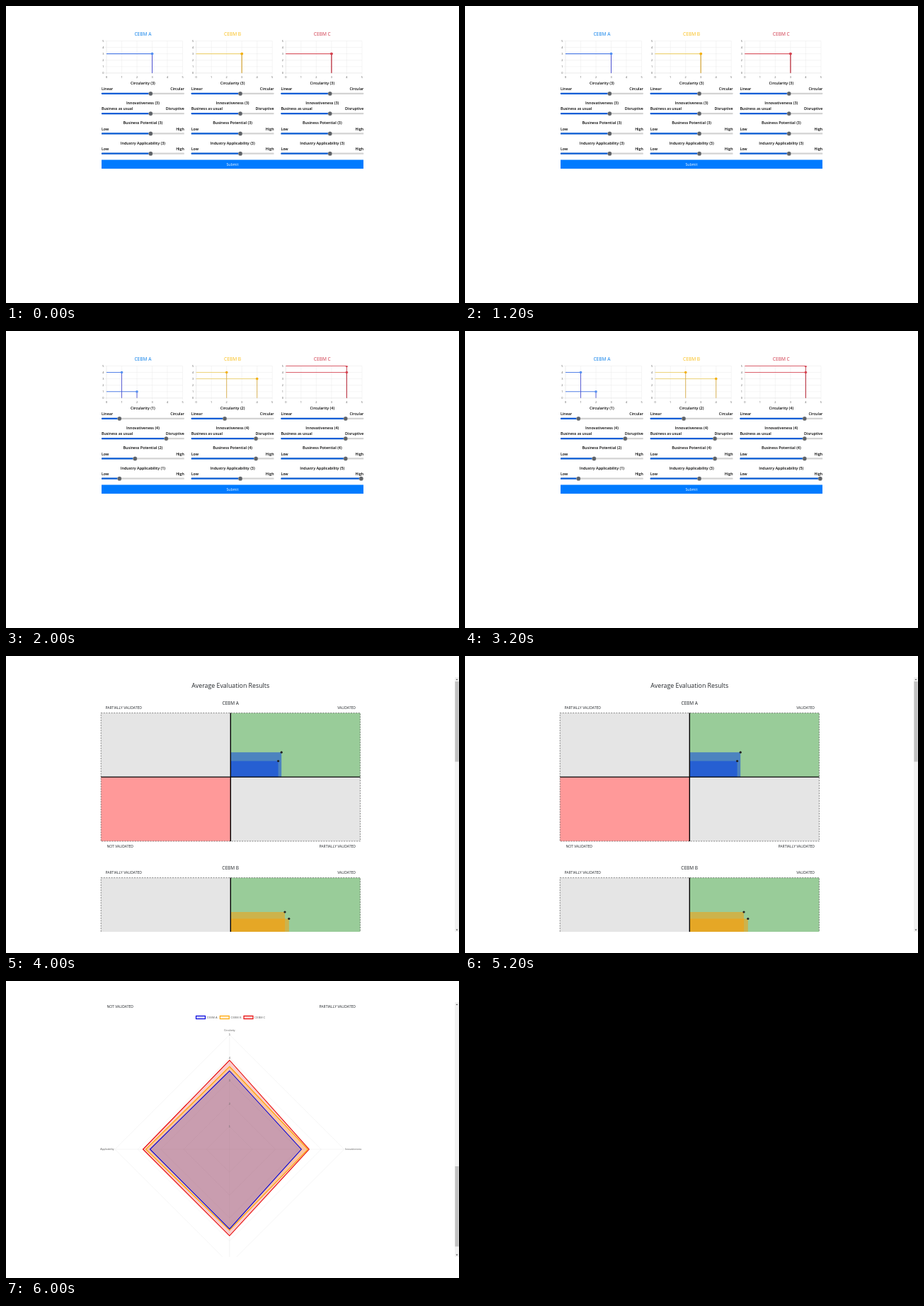
An HTML page that plays this animation: 640x420 px, repeating every 8 s.

```html
<!DOCTYPE html>
<html lang="en">
<head>
<meta charset="utf-8">
<title>Evaluation form and results</title>
<style>
html, body { margin: 0; width: 100%; height: 100%; overflow: hidden; background: #fff; }
svg { display: block; width: 640px; height: 420px; font-family: "Open Sans", "Noto Sans", sans-serif; fill: #212529; }
.scene { visibility: hidden; animation: show 8s step-end infinite; }
#votes { animation-delay: -6s; }
#quads { animation-delay: -4s; }
#radar { animation-delay: -2s; }
@keyframes show { 0% { visibility: visible; } 25%, 100% { visibility: hidden; } }
.arial { font-family: "Liberation Sans", Arial, sans-serif; fill: #666; }
.bold { font-weight: 600; fill: #000; }
</style>
</head>
<body>
<svg viewBox="0 0 640 420">
  <defs><clipPath id="page"><rect x="0" y="30" width="640" height="360"/></clipPath></defs>
  <g class="scene" id="start"></g>
  <g class="scene" id="votes"></g>
  <g class="scene" id="quads"></g>
  <g class="scene" id="radar"></g>
</svg>
<script>
const text = (x, y, size, str, anchor = "middle", extra = "") =>
  `<text x="${x}" y="${y}" font-size="${size}" text-anchor="${anchor}" ${extra}>${str}</text>`;
const rect = (x, y, w, h, fill, extra = "") =>
  `<rect x="${x}" y="${y}" width="${w}" height="${h}" fill="${fill}" ${extra}/>`;
const line = (x1, y1, x2, y2, color, w = 0.4) =>
  `<path d="M${x1} ${y1}L${x2} ${y2}" stroke="${color}" stroke-width="${w}"/>`;
const dot = (x, y, r, fill, extra = "") => `<circle cx="${x}" cy="${y}" r="${r}" fill="${fill}" ${extra}/>`;
const put = (id, html) => document.getElementById(id).innerHTML = html;

// Voting form: four sliders drive two points per chart
const panels = [
  { name: "CEBM A", x: 135, title: "#0a7fea", h: "#4274e6", v: "#4a4fd0", dot: "#5590f2" },
  { name: "CEBM B", x: 261.7, title: "#f9bd14", h: "#ecd06c", v: "#d9ae48", dot: "#f3b012" },
  { name: "CEBM C", x: 388.4, title: "#d03a4c", h: "#d9505c", v: "#bf3b48", dot: "#d64350" }
];
const sliders = [
  ["Circularity", "Linear", "Circular"],
  ["Innovativeness", "Business as usual", "Disruptive"],
  ["Business Potential", "Low", "High"],
  ["Industry Applicability", "Low", "High"]
];

function chart(p, vals) {
  const px = v => p.x + 7 + v * 21.5, py = v => 94.8 - v * 9.07;
  let s = "";
  for (let i = 0; i <= 5; i++) {
    const c = i ? "#e6e6e6" : "#cfcfcf";
    s += line(px(i), py(5), px(i), 96.8, c) + line(p.x + 5, py(i), px(5), py(i), c);
    s += text(px(i), 102.2, 3.9, i, "middle", 'fill="#555"') + text(p.x + 3.6, py(i) + 1.4, 3.9, i, "end", 'fill="#555"');
  }
  for (const [a, b] of [[vals[2], vals[3]], [vals[0], vals[1]]]) {
    const x = px(a), y = py(b);
    s += line(px(0), y, x, y, p.h, 0.9) + line(x, y, x, py(0), p.v, 0.9);
    s += b === 5
      ? `<path d="M${x - 1.8} ${y}A1.8 1.8 0 0 0 ${x + 1.8} ${y}Z" fill="${p.dot}"/>`
      : dot(x, y, 1.8, p.dot);
  }
  return s;
}

function slider(p, [name, low, high], val, i) {
  const y = 123.8 + i * 28.3, x = p.x + 3.3 + val * 22.02, mid = p.x + 58.4;
  return text(mid, y - 13, 5.4, `${name} (${val})`, "middle", 'class="bold"')
    + text(p.x, y - 4.9, 5.25, low, "start", 'class="bold"')
    + text(p.x + 116.8, y - 4.9, 5.25, high, "end", 'class="bold"')
    + rect(p.x, y - 1.1, 116.8, 2.2, "#d3d3d3", 'rx="0.6"')
    + rect(p.x, y - 1.1, x - p.x, 2.2, "#0b5ed7", 'rx="0.6"')
    + dot(x, y + 0.2, 3.1, "#bbb") + dot(x, y, 2.6, "#5f6368");
}

function form(votes) {
  return panels.map((p, n) =>
    text(p.x + 58.4, 42.3, 6.6, p.name, "middle", `fill="${p.title}"`)
    + chart(p, votes[n])
    + sliders.map((s, i) => slider(p, s, votes[n][i], i)).join("")
  ).join("") + rect(135, 217.5, 370, 12.6, "#007bff") + text(320, 226, 5.1, "Submit", "middle", 'fill="#fff"');
}

// Results page
const scrollbar = y => rect(634, 30, 6, 360, "#f1f1f1") + rect(634.4, y, 5.2, 113.5, "#c1c1c1")
  + '<path d="M635.6 34L637 32.2L638.4 34Z" fill="#606060"/><path d="M635.6 386.6L637 388.4L638.4 386.6Z" fill="#606060"/>';
const page = (body, y) => `<g clip-path="url(#page)">${body}</g>` + scrollbar(y);

const lowerLabels = y => text(142.5, y, 5.05, "NOT VALIDATED", "start")
  + text(494, y, 5.05, "PARTIALLY VALIDATED", "end");

function quadrant(name, top, color, points) {
  const mid = top + 90.5, cx = 317.3;
  return text(317.2, top - 11.2, 6.5, name)
    + text(140.5, top - 5.2, 5.05, "PARTIALLY VALIDATED", "start")
    + text(494, top - 5.2, 5.05, "VALIDATED", "end")
    + rect(134.2, top, 183.1, 90.5, "#e5e5e5") + rect(cx, top, 183.1, 90.5, "#99cc99")
    + rect(134.2, mid, 183.1, 90.8, "#ff9999") + rect(cx, mid, 183.1, 90.8, "#e5e5e5")
    + points.map(([x, y]) => rect(cx, y, x - cx, mid - y, color, 'fill-opacity="0.5"')).join("")
    + rect(134.2, top, 366.2, 181.3, "none", 'stroke="#555" stroke-width="0.7" stroke-dasharray="2 1.6"')
    + line(134.2, mid, 500.4, mid, "#000", 1.2) + line(cx, top, cx, top + 181.3, "#000", 1.4)
    + points.map(([x, y]) => dot(x, y, 1.6, "#222")).join("")
    + lowerLabels(top + 190.3);
}

const cx = 315.8, cy = 238, step = 32.4;
const diamond = (t, r, b, l, extra) =>
  `<path d="M${cx} ${t}L${r} ${cy}L${cx} ${b}L${l} ${cy}Z" ${extra}/>`;

function radar() {
  const series = [
    ["CEBM A", "0,0,220", 268, [127, 417.3, 350.6, 203.4]],
    ["CEBM B", "255,165,0", 301.8, [121, 426.5, 352.5, 197.5]],
    ["CEBM C", "230,0,0", 335.5, [112, 428.2, 360.3, 193.5]]
  ];
  const paint = rgb => `fill="rgba(${rgb},0.2)" stroke="rgb(${rgb})" stroke-width="1.1"`;
  let s = lowerLabels(37.8);
  for (let i = 1; i <= 5; i++) {
    const d = i * step;
    s += diamond(cy - d, cx + d, cy + d, cx - d, 'fill="none" stroke="#000" stroke-opacity="0.1" stroke-width="0.4"');
  }
  const r = 5 * step;
  s += line(cx - r, cy, cx + r, cy, "#e6e6e6") + line(cx, cy - r, cx, cy + r, "#e6e6e6");
  for (const [, rgb, , pts] of [...series].reverse()) s += diamond(...pts, paint(rgb));
  for (const [name, rgb, x] of series)
    s += `<rect x="${x + 0.5}" y="49.4" width="13" height="4.2" ${paint(rgb)}/>`
      + text(x + 15.8, 52.8, 3.9, name, "start", 'class="arial"');
  for (let i = 1; i <= 5; i++) s += text(cx, cy - i * step + 1.3, 3.9, i, "middle", 'class="arial"');
  return s + text(cx, 70.8, 3.5, "Circularity", "middle", 'class="arial"')
    + text(479, 239.2, 3.5, "Innovativeness", "start", 'class="arial"')
    + text(152.6, 239.2, 3.65, "Applicability", "end", 'class="arial"');
}

put("start", form([[3, 3, 3, 3], [3, 3, 3, 3], [3, 3, 3, 3]]));
put("votes", form([[1, 4, 2, 1], [2, 4, 4, 3], [4, 4, 4, 5]]));
put("quads", page(
  text(317.2, 44.7, 8.8, "Average Evaluation Results")
  + quadrant("CEBM A", 80.6, "rgb(0,60,230)", [[389.2, 136.2], [384.6, 148.5]])
  + quadrant("CEBM B", 313.6, "rgb(255,155,0)", [[394, 362], [399.8, 371.5]]), 36));
put("radar", page(radar(), 262));
</script>
</body>
</html>
```
